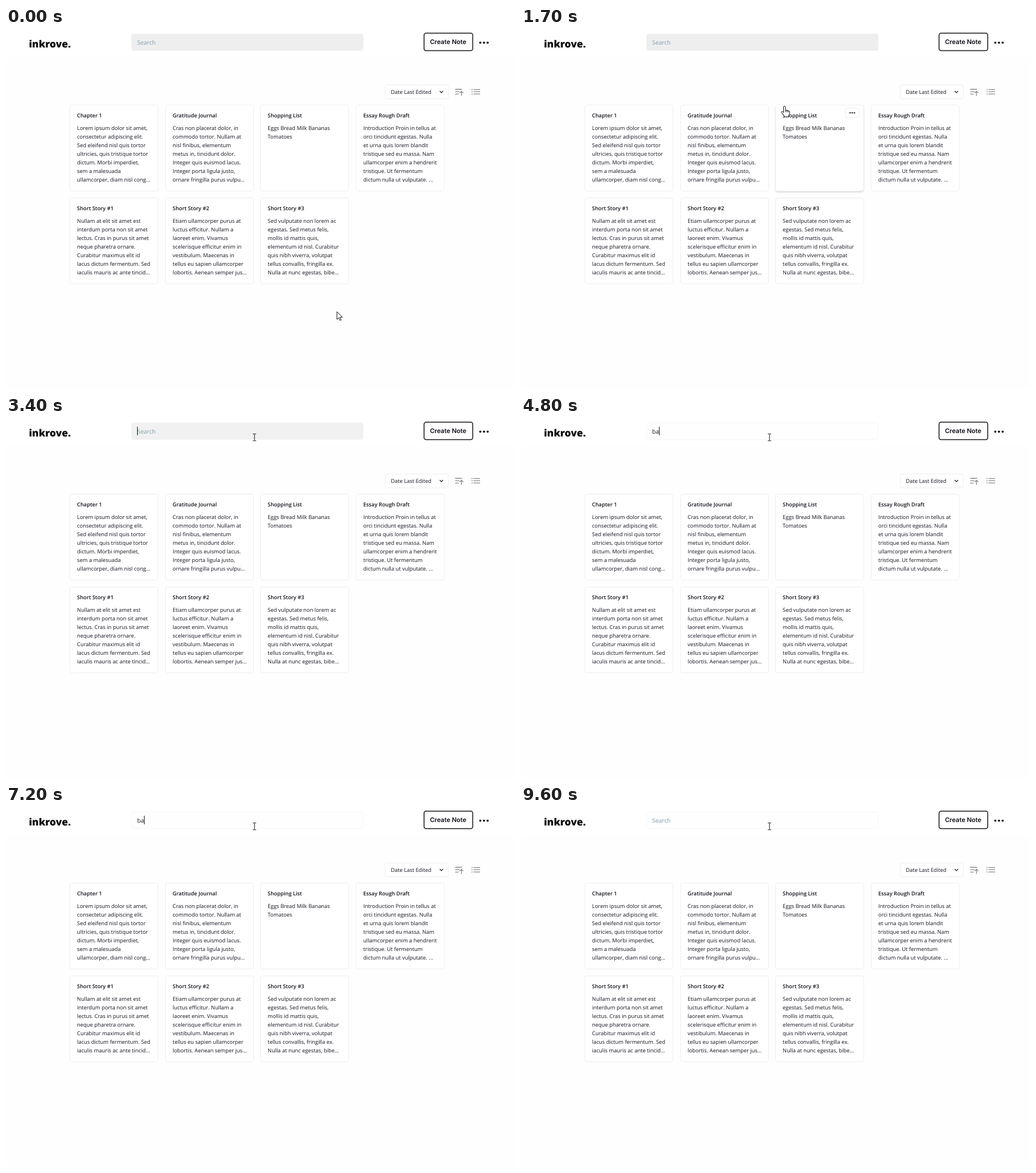
These frames come from a looping animation (889x630 px, 9800 ms). An HTML page:

```html
<!DOCTYPE html>
<html lang="en">
<head>
<meta charset="utf-8">
<title>Notes</title>
<style>
  html, body { margin: 0; width: 100%; height: 100%; overflow: hidden; background: #fefefe; }
  svg { display: block; width: 889px; height: 630px; }
  text { font: 9.35px "Open Sans", "Noto Sans", sans-serif; fill: #14141f; text-rendering: geometricPrecision; white-space: pre; }
  .brand { font-size: 17.3px; font-weight: 800; fill: #0a0a0a; }
  .button { font: 600 11px Inter, sans-serif; fill: #0e0e16; }
  .field { font-size: 10.3px; }
  .title { font-size: 9.25px; font-weight: 600; fill: #14141c; }
  .box { fill: #fff; stroke: #eeeeee; }
  .icon { fill: none; stroke: #868686; stroke-width: 1.3; }
  .hover { filter: drop-shadow(0 2px 1.2px rgba(0, 0, 0, .13)); }
  .cursor { fill: #fff; stroke: #111; stroke-width: 1; stroke-linejoin: round; }
</style>
</head>
<body>
<svg id="stage" viewBox="0 0 889 630"></svg>
<script>
const LOOP = 9800;
const STEP = 100;
const CARD = { x: 111, y: 134, w: 154, h: 150, dx: 166.7, dy: 162.4 };

const NOTES = [
  ["Chapter 1", "Lorem ipsum dolor sit amet,|consectetur adipiscing elit.|Sed eleifend nisl quis tortor|ultricies, quis tristique tortor|dictum. Morbi imperdiet,|sem a malesuada|ullamcorper, diam nisl cong..."],
  ["Gratitude Journal", "Cras non placerat dolor, in|commodo tortor. Nullam at|nisl finibus, elementum|metus in, tincidunt dolor.|Integer quis euismod lacus.|Integer porta ligula justo,|ornare fringilla purus vulpu..."],
  ["Shopping List", "Eggs Bread Milk Bananas|Tomatoes"],
  ["Essay Rough Draft", "Introduction Proin in tellus at|orci tincidunt egestas. Nulla|et urna quis lorem blandit|tristique sed eu massa. Nam|ullamcorper enim a hendrerit|tristique. Ut fermentum|dictum nulla ut vulputate. ..."],
  ["Short Story #1", "Nullam at elit sit amet est|interdum porta non sit amet|lectus. Cras in purus sit amet|neque pharetra ornare.|Curabitur maximus elit id|lacus dictum fermentum. Sed|iaculis mauris ac ante tincid..."],
  ["Short Story #2", "Etiam ullamcorper purus at|luctus efficitur. Nullam a|laoreet enim. Vivamus|scelerisque efficitur enim in|vestibulum. Maecenas in|tellus eu sapien ullamcorper|lobortis. Aenean semper jus..."],
  ["Short Story #3", "Sed vulputate non lorem ac|egestas. Sed metus felis,|mollis id mattis quis,|elementum id nisl. Curabitur|quis nibh viverra, volutpat|tellus convallis, fringilla ex.|Nulla at nunc egestas, bibe..."]
];

// [time, x, y] of the pointer's hot spot
const POINTER = [[200, 578, 495], [1700, 460.5, 136.5], [2500, 434, 37], [2700, 434, 37], [2800, 434, 35.5]];
// [time, query, caret visible]
const TYPING = [
  [0, "", 0], [3400, "", 1], [4400, "", 0], [4600, "b", 1], [4800, "ba", 1], [5100, "ban", 1],
  [5600, "ban", 0], [6100, "ban", 1], [7200, "ba", 1], [7300, "", 1], [8400, "", 0], [9500, "", 1], [9600, "", 0]
];

const stage = document.getElementById("stage");

function add(parent, tag, attrs = {}, content = "") {
  const node = document.createElementNS("http://www.w3.org/2000/svg", tag);
  for (const key in attrs) node.setAttribute(key, attrs[key]);
  node.textContent = content;
  parent.append(node);
  return node;
}
const rect = (parent, x, y, width, height, rx, attrs) => add(parent, "rect", { x, y, width, height, rx, ...attrs });
const label = (parent, x, y, content, cls = "") => add(parent, "text", { x, y, class: cls }, content);
const path = (parent, d, attrs) => add(parent, "path", { d, ...attrs });
const show = (node, visible) => node.setAttribute("visibility", visible ? "visible" : "hidden");

function dots(parent, cx, cy, gap, r, fill) {
  for (const i of [-1, 0, 1]) add(parent, "circle", { cx: cx + i * gap, cy, r, fill });
}

function makeCard(col, row, height, [title, body]) {
  const x = Math.round(CARD.x + col * CARD.dx) + .5;
  const y = Math.round(CARD.y + row * CARD.dy) + .5;
  const group = add(stage, "g");
  const frame = rect(group, x, y, CARD.w, height, 4, { class: "box" });
  label(group, x + 12.6, y + 21.9, title, "title");
  body.split("|").forEach((line, i) => label(group, x + 12.6, y + 43.9 + i * 14.87, line));
  const menu = add(group, "g");
  rect(menu, x + 122, y + 5, 24, 17, 3, { class: "box" });
  dots(menu, x + 134, y + 13.5, 3.8, 1.35, "#333");
  show(menu, false);
  return { group, frame, menu, x, y };
}

// Header
rect(stage, 0, 0, 889, 50, 0, { fill: "#fff" });
const headerLine = rect(stage, 0, 48, 889, 1, 0, { fill: "#f6f6f6" });
label(stage, 40, 33.8, "inkrove.", "brand");
const field = rect(stage, 219, 10, 405, 29.5, 4);
const query = label(stage, 229, 28.7, "", "field");
const caret = rect(stage, 0, 17, 1, 15, 0, { fill: "#111" });
rect(stage, 730.2, 9.1, 85, 30.4, 3.5, { fill: "#fff", stroke: "#161616", "stroke-width": 1.5 });
label(stage, 740.5, 27.9, "Create Note", "button");
dots(stage, 834.8, 25.6, 6.4, 1.9, "#111");

// Toolbar
rect(stage, 662.5, 99.5, 110, 24, 3, { class: "box" });
label(stage, 672.2, 115.2, "Date Last Edited");
path(stage, "M757.6 110l2.9 2.9 2.9-2.9", { fill: "none", stroke: "#222", "stroke-width": 1.3 });
path(stage, "M784.5 107h12M784.5 111.2h7.5M784.5 115.3h6M795.5 118.5v-8M792.3 113.5l3.2-3.2 3.2 3.2", { class: "icon" });
path(stage, "M813 107.3h2M813 111.2h2M813 115.1h2M816.5 107.3h11.5M816.5 111.2h11.5M816.5 115.1h11.5", { class: "icon" });

// Cards
const cards = NOTES.map((note, i) => makeCard(i % 4, Math.floor(i / 4), CARD.h, note));
const match = makeCard(0, 0, 75, NOTES[2]);

// Pointer shapes, each drawn around its hot spot
const pointer = add(stage, "g", { class: "cursor" });
const shapes = {
  arrow: path(pointer, "M0 0V13.5L3.2 10.6 5.3 15.4 7.4 14.5 5.3 9.8H9.6Z"),
  hand: path(pointer, "M-2 1.5a1.7 1.7 0 0 1 3.4 0V7l1.8-.3 2 .6 1.8.5q1.5.4 1.5 2V13l-1.5 3v2.5H-1V16.5L-5.5 11q-.6-1.5.8-1.9 1 0 2.7 2zM1.4 7v3.5M4 7v3.5M6.4 7.7v3"),
  beam: path(pointer, "M-2.8-6H-.6L0-5.4.6-6H2.8M-2.8 6H-.6L0 5.4.6 6H2.8M0-5.4V5.4", { fill: "none" })
};

function pointerAt(t) {
  const next = POINTER.findIndex(key => key[0] > t);
  if (next === 0) return POINTER[0].slice(1);
  if (next < 0) return POINTER[POINTER.length - 1].slice(1);
  const [t0, x0, y0] = POINTER[next - 1], [t1, x1, y1] = POINTER[next];
  const p = (t - t0) / (t1 - t0);
  const eased = p * p * (3 - 2 * p);
  return [x0 + (x1 - x0) * eased, y0 + (y1 - y0) * eased];
}

function drawSearch(t) {
  const [, typed, caretOn] = TYPING.filter(row => row[0] <= t).pop();
  const focus = Math.min(1, Math.max(0, (t - 3300) / 500));
  const shade = Math.round(238 + 16 * focus);
  field.setAttribute("fill", `rgb(${shade},${shade},${shade})`);
  field.setAttribute("stroke", focus ? "#f6f6f6" : "none");
  query.textContent = typed || "Search";
  query.style.fill = typed ? "#1c1c1c" : "#7f9daa";
  caret.setAttribute("x", Math.floor(229 + (typed ? query.getComputedTextLength() : 0)));
  show(caret, caretOn);
  return typed === "ban";
}

function draw(time) {
  const t = Math.floor((time % LOOP) / STEP) * STEP;
  const filtered = drawSearch(t);
  const [x, y] = pointerAt(t);

  let shape = y < 40 ? "beam" : "arrow";
  for (const card of cards) {
    const over = x >= card.x && x <= card.x + CARD.w && y >= card.y && y <= card.y + CARD.h;
    card.frame.setAttribute("class", over ? "box hover" : "box");
    show(card.menu, over);
    card.group.style.display = filtered ? "none" : "";
    if (over) shape = "hand";
  }
  match.group.style.display = filtered ? "" : "none";
  show(headerLine, filtered);

  pointer.setAttribute("transform", `translate(${x} ${y})`);
  for (const name in shapes) show(shapes[name], name === shape);
}

const start = performance.now();
function tick() {
  draw(performance.now() - start);
  requestAnimationFrame(tick);
}
tick();
</script>
</body>
</html>
```
